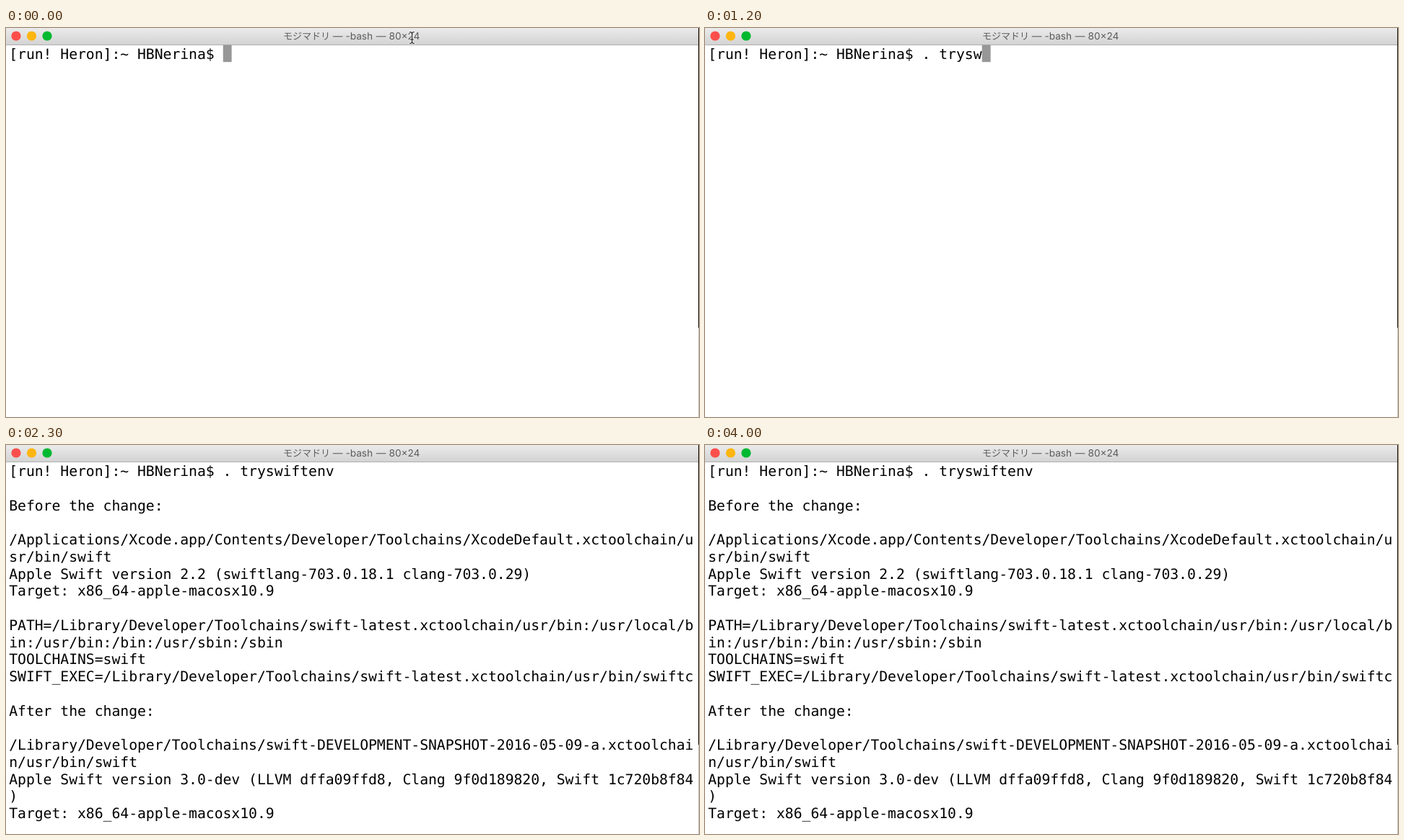
Recreate the animation shown at these times as an HTML page. Size 960 by 540 pixels, loop 4100 ms.

```html
<!DOCTYPE html>
<html lang="ja">
<head>
<meta charset="utf-8">
<title>Shell session</title>
<style>
  html, body { margin: 0; width: 100%; height: 100%; overflow: hidden; background: #fff; }
  svg { display: block; width: 960px; height: 540px; }
  text { white-space: pre; text-rendering: geometricPrecision; }
  #screen { font: 19.7px "DejaVu Sans Mono", monospace; fill: #000; }
  #title { font: 13.6px Inter, sans-serif; fill: #5c5c5c; }
  #title .kana { font: 13px "Noto Sans CJK JP", "Noto Sans CJK", sans-serif; }
</style>
</head>
<body>
<svg viewBox="0 0 960 540">
  <defs>
    <linearGradient id="bar" x2="0" y2="1">
      <stop offset="0" stop-color="#ebebeb"/>
      <stop offset="1" stop-color="#d3d3d3"/>
    </linearGradient>
  </defs>
  <rect width="960" height="540" fill="#fff"/>
  <rect width="960" height="23" fill="url(#bar)"/>
  <rect y="23" width="960" height="1" fill="#b0b0b0"/>
  <circle cx="14" cy="11" r="6.6" fill="#fc4f4c"/>
  <circle cx="35.5" cy="11" r="6.6" fill="#fdb510"/>
  <circle cx="57" cy="11" r="6.6" fill="#00b930"/>
  <g id="title">
    <text class="kana" x="384" y="16">モジマドリ</text>
    <text x="459.5" y="16" text-anchor="middle">—</text>
    <text x="470.5" y="16">-bash</text>
    <text x="519.5" y="16" text-anchor="middle">—</text>
    <text x="530.5" y="16">80×24</text>
  </g>
  <rect x="959" y="416" width="1" height="124" fill="#c4c4c4"/>
  <rect x="959" width="1" height="416" fill="#111"/>
  <rect id="caret" y="23.5" width="11.9" height="23.7" fill="#979797"/>
  <g id="screen"></g>
  <g id="pointer" fill="none" stroke-linecap="round">
    <path id="beam" d="M559.5 5.5Q562.5 5.5 562.5 8V19Q562.5 21.5 559.5 21.5M565.5 5.5Q562.5 5.5 562.5 8M562.5 19Q562.5 21.5 565.5 21.5M560.5 16H564.5" stroke="#fff" stroke-opacity=".7" stroke-width="2.6"/>
    <use href="#beam" style="display:none"/>
    <path d="M559.5 5.5Q562.5 5.5 562.5 8V19Q562.5 21.5 559.5 21.5M565.5 5.5Q562.5 5.5 562.5 8M562.5 19Q562.5 21.5 565.5 21.5M560.5 16H564.5" stroke="#222" stroke-width="1.1"/>
  </g>
</svg>
<script>
const LOOP = 4100, OUTPUT_AT = 2300;
const LEFT = 4.2, ADVANCE = 11.86, BASELINE = 43.2, LEADING = 23.75;
const PROMPT = "[run! Heron]:~ HBNerina$ ";
const COMMAND = ". tryswiftenv";
// One keystroke time per character of the command
const KEYS = [300, 400, 500, 600, 900, 1000, 1100, 1300, 1400, 1500, 1800, 2000, 2100];
const OUTPUT = `
Before the change:

/Applications/Xcode.app/Contents/Developer/Toolchains/XcodeDefault.xctoolchain/u
sr/bin/swift
Apple Swift version 2.2 (swiftlang-703.0.18.1 clang-703.0.29)
Target: x86_64-apple-macosx10.9

PATH=/Library/Developer/Toolchains/swift-latest.xctoolchain/usr/bin:/usr/local/b
in:/usr/bin:/bin:/usr/sbin:/sbin
TOOLCHAINS=swift
SWIFT_EXEC=/Library/Developer/Toolchains/swift-latest.xctoolchain/usr/bin/swiftc

After the change:

/Library/Developer/Toolchains/swift-DEVELOPMENT-SNAPSHOT-2016-05-09-a.xctoolchai
n/usr/bin/swift
Apple Swift version 3.0-dev (LLVM dffa09ffd8, Clang 9f0d189820, Swift 1c720b8f84
)
Target: x86_64-apple-macosx10.9`.split("\n");

const byId = id => document.getElementById(id);
const screen = byId("screen"), caret = byId("caret"), pointer = byId("pointer");

function addNode(parent, name, attrs = {}) {
  const node = document.createElementNS("http://www.w3.org/2000/svg", name);
  for (const key in attrs) node.setAttribute(key, attrs[key]);
  return parent.appendChild(node);
}

function addLine(parent, row, content) {
  const line = addNode(parent, "text", { x: LEFT, y: BASELINE + row * LEADING });
  line.textContent = content;
  return line;
}

const show = (node, on) => node.setAttribute("visibility", on ? "visible" : "hidden");

const inputLine = addLine(screen, 0, PROMPT);
const result = addNode(screen, "g");
OUTPUT.forEach((content, i) => addLine(result, i + 1, content));

function draw(t) {
  const typed = KEYS.filter(key => key <= t).length;
  const done = t >= OUTPUT_AT;
  inputLine.textContent = PROMPT + COMMAND.slice(0, typed);
  caret.setAttribute("x", LEFT + (PROMPT.length + typed) * ADVANCE);
  show(caret, !done);
  show(result, done);
  show(pointer, t < KEYS[0]);
}

function tick() {
  draw(performance.now() % LOOP);
  requestAnimationFrame(tick);
}
tick();
</script>
</body>
</html>
```
